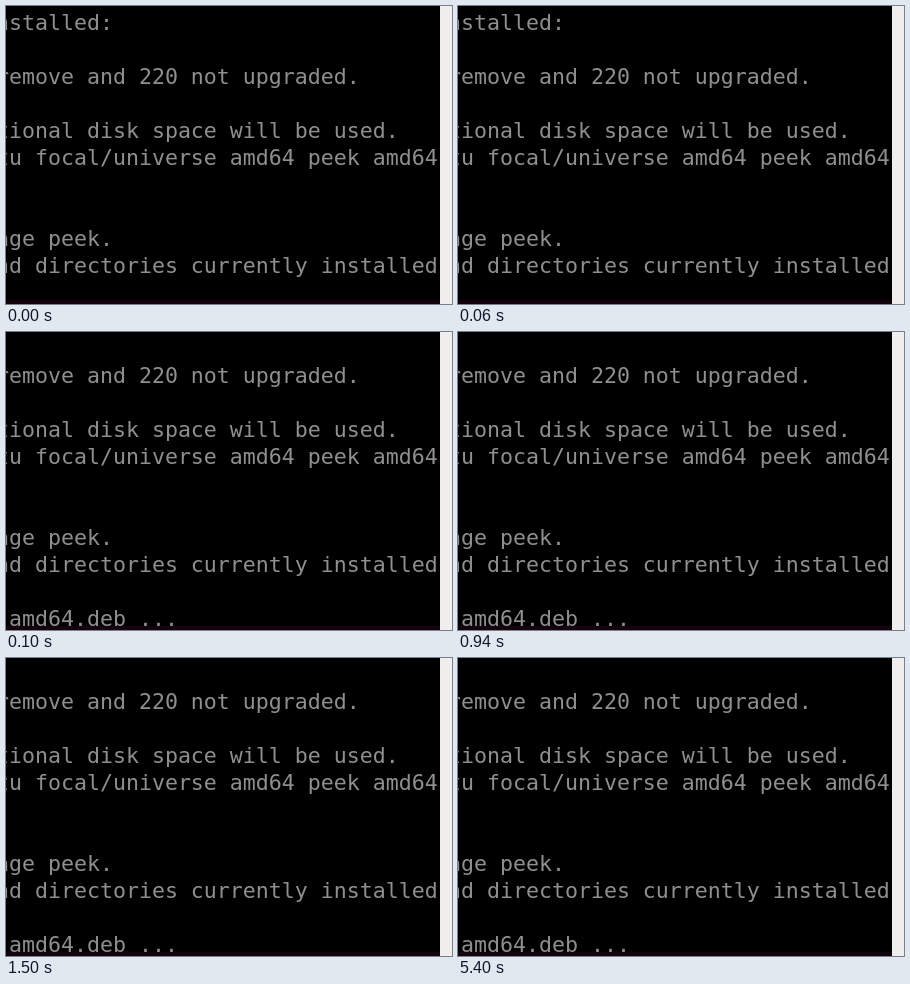
An HTML page that plays this animation: 446x298 px, repeating every 8 s.

```html
<!DOCTYPE html>
<html lang="en">
<head>
<meta charset="utf-8">
<style>
  html, body { margin: 0; width: 100%; height: 100%; overflow: hidden; background: #000; }
  svg { display: block; width: 446px; height: 298px; }
  text { font: 21.593px "DejaVu Sans Mono", monospace; fill: #8f908d; white-space: pre; }
</style>
</head>
<body>
<svg viewBox="0 0 446 298">
  <rect width="446" height="298" fill="#000"/>
  <rect y="294" width="446" height="4" fill="#14020e"/>
  <g id="log"></g>
  <rect x="434" width="12" height="298" fill="#efeeed"/>
</svg>
<script>
  const LOOP = 8000, SCROLL_AT = 100, LINE = 27, BASELINE = 24, LEFT = -10;
  const lines = [
    "nstalled:",
    "",
    "remove and 220 not upgraded.",
    "",
    "tional disk space will be used.",
    "tu focal/universe amd64 peek amd64",
    "",
    "",
    "age peek.",
    "nd directories currently installed",
    "",
    "_amd64.deb ..."
  ];
  const log = document.getElementById("log");

  lines.forEach((line, row) => {
    if (!line) return;
    const text = document.createElementNS("http://www.w3.org/2000/svg", "text");
    text.setAttribute("x", LEFT);
    text.setAttribute("y", BASELINE + row * LINE);
    text.textContent = line;
    log.append(text);
  });

  // The terminal jumps up by one line when the next message arrives.
  function draw() {
    const time = performance.now() % LOOP;
    const scrolled = time < SCROLL_AT ? 0 : LINE;
    log.setAttribute("transform", `translate(0 ${-scrolled})`);
    requestAnimationFrame(draw);
  }
  draw();
</script>
</body>
</html>
```
